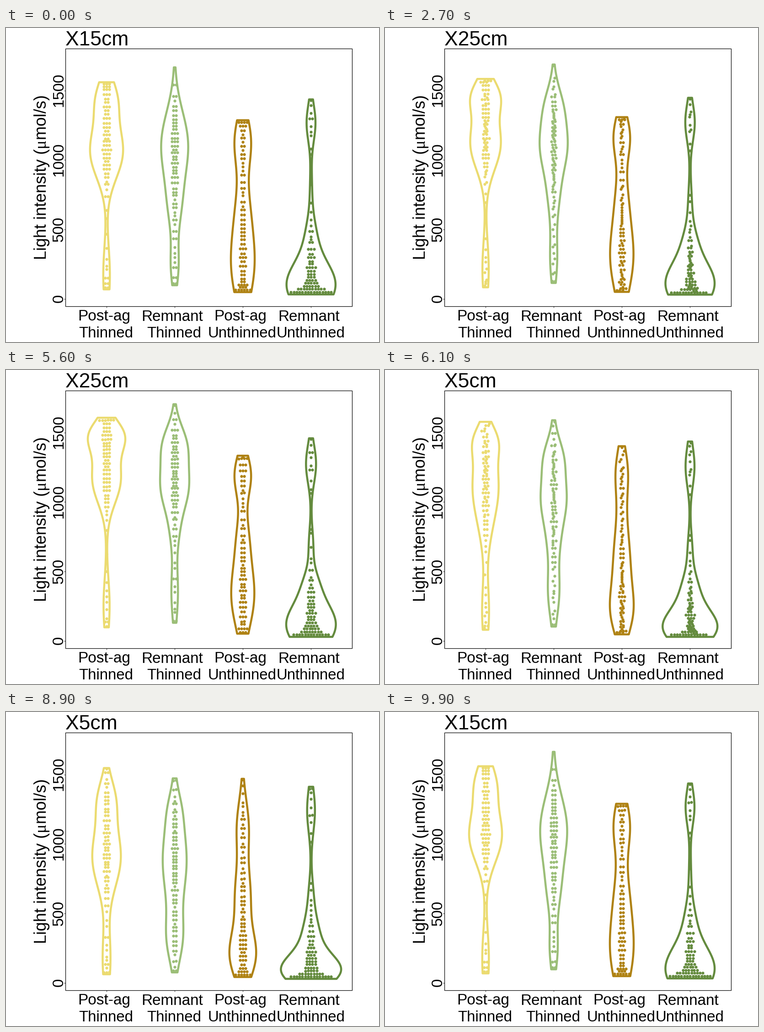
Write a matplotlib script that moves like this. It is 816x686 px and loops after 10 s.

```python
import math

import matplotlib.pyplot as plt
import numpy as np
from matplotlib.animation import FuncAnimation
from matplotlib.patches import Polygon, Rectangle

W, H, DPI = 816, 686, 128
CENTERS = [220, 369, 518, 667.3]
COLORS = ["#EBDB70", "#9BBE77", "#AF8213", "#648B3E"]
TITLES = ["X15cm", "X25cm", "X5cm"]
STARTS = [22, 56, 89]  # first moving frame after each state
STEPS = 12
DOTS, DOT_GAP, BIN = 86, 6.3, 6.1

plt.rcParams.update({
    "font.family": "Liberation Sans",
    "mathtext.fontset": "custom",
    "mathtext.rm": "Liberation Serif",
})


def pt(px):
    return px * 72 / DPI


def mixture(y, bumps):
    """Half width at height y: a sum of bell curves (center, spread, size)."""
    return sum(size * np.exp(-((y - mid) / spread) ** 2 / 2)
               for mid, spread, size in bumps)


def sample(top, bottom, bumps, rng):
    """Heights spread like the mixture; those past an end fold back inside."""
    grid = np.linspace(top - 100, bottom + 100, 1200)
    total = np.cumsum(mixture(grid, bumps))
    share = (np.arange(DOTS) + rng.random(DOTS)) / DOTS
    y = np.interp(share * total[-1], total, grid)
    y = np.where(y > bottom, bottom - 0.3 * (y - bottom), y)
    y = np.where(y < top, top + 0.3 * (top - y), y)
    y = np.sort(y)[::-1]
    y[0], y[-1] = bottom - 2, top + 2
    return y


def stack(heights):
    """Bin falling heights and set each bin as one centered row of dots."""
    dots, first = [], 0
    while first < len(heights):
        n = int(np.sum(heights[first:] > heights[first] - BIN))
        row = heights[first:first + n]
        y = (row[0] + row[-1]) / 2
        dots += [((k - (n - 1) / 2) * DOT_GAP, y) for k in range(n)]
        first += n
    return np.array(dots)


class Violin:
    def __init__(self, top, bottom, bumps, seed):
        self.ys = np.linspace(top, bottom, 160)
        self.widths = mixture(self.ys, bumps)
        rng = np.random.default_rng(seed)
        self.dots = stack(sample(top, bottom, bumps, rng))


violins = {}


def add(state, group, top, bottom, *bumps):
    violins[state, group] = Violin(top, bottom, bumps, 10 * state + group)


add(0, 0, 118.5, 571, (153, 44, 20.5), (270, 58, 35.5), (540, 65, 7.2))
add(0, 1, 86, 562, (255, 72, 29), (390, 55, 11), (520, 46, 8))
add(0, 2, 201.5, 577, (247, 55, 17.5), (385, 60, 9), (515, 80, 25))
add(0, 3, 156, 582, (207, 40, 9.7), (360, 50, 2.3), (450, 38, 8), (561, 52, 53.5))

add(1, 0, 104, 562, (142, 34, 35), (238, 52, 31), (515, 60, 6.6))
add(1, 1, 73.5, 552, (160, 42, 22.5), (255, 52, 29.5), (355, 40, 6), (485, 60, 7))
add(1, 2, 188, 576, (230, 45, 18), (360, 50, 9), (490, 72, 25))
add(1, 3, 149, 583, (205, 42, 11), (385, 40, 4.8), (465, 30, 9), (556, 50, 54))

add(2, 0, 122.5, 573, (190, 45, 16.5), (318, 66, 31), (540, 65, 8.5))
add(2, 1, 146, 569, (210, 38, 6), (325, 85, 26), (497, 52, 15))
add(2, 2, 145, 579, (250, 58, 12.5), (400, 62, 16), (532, 52, 27.5))
add(2, 3, 163.5, 583, (215, 48, 8.5), (405, 40, 5), (490, 40, 17), (565, 34, 63))

fig = plt.figure(figsize=(W / DPI, H / DPI), dpi=DPI, facecolor="white")
ax = fig.add_axes([0, 0, 1, 1])
ax.set_xlim(0, W)
ax.set_ylim(H, 0)
ax.axis("off")


def label(x, y, text, px, ha="center", rotation=0):
    return ax.text(x, y, text, fontsize=pt(px), ha=ha, va="baseline",
                   rotation=rotation, rotation_mode="anchor", color="black")


def tick(xs, ys):
    ax.plot(xs, ys, color="#333333", lw=pt(1), solid_capstyle="butt")


for value in range(0, 2000, 500):
    y = 592.3 - value * 0.3038
    tick([127, 130], [y, y])
    label(124.5, y - 1, str(value), 33.3, rotation=90)
for cx, first, second in zip(CENTERS, ["Post-ag", "Remnant"] * 2,
                             ["Thinned"] * 2 + ["Unthinned"] * 2):
    tick([cx, cx], [608, 611])
    label(cx - 5, 639.5, first, 33.2)
    label(cx - 1, 675.5, second, 33)
label(88, 326.5, r"Light intensity ($\mathrm{\mu}$mol/s)", 36.1, rotation=90)
title = label(130, 38.5, TITLES[0], 44.4, ha="left")

outlines, dot_sets = [], []
for color in COLORS:
    shape = Polygon([[0, 0], [1, 1], [0, 1]], closed=True, fill=False,
                    ec=color, lw=pt(4.5), joinstyle="round")
    outlines.append(ax.add_patch(shape))
    dot_sets += ax.plot([], [], "o", color=color, ms=pt(6.3), mew=0)
ax.add_patch(Rectangle((129.7, 44.7), 627.3, 563.3, fill=False,
                       ec="black", lw=pt(1.2), zorder=5))


def phase(frame):
    """Current state and the step (0 to STEPS - 1) towards the next one."""
    for state, start in enumerate(STARTS):
        if frame < start:
            return state, 0
        if frame < start + STEPS - 1:
            return state, frame - start + 1
    return 0, 0


def draw(frame):
    state, step = phase(frame)
    after = (state + 1) % len(TITLES)
    ease = (1 - math.cos(math.pi * step / STEPS)) / 2
    title.set_text(TITLES[after if step >= STEPS / 2 else state])

    def tween(a, b):
        return a + (b - a) * ease

    for g, cx in enumerate(CENTERS):
        a, b = violins[state, g], violins[after, g]
        ys, half = tween(a.ys, b.ys), tween(a.widths, b.widths)
        outlines[g].set_xy(np.column_stack([
            np.concatenate([cx - half, (cx + half)[::-1]]),
            np.concatenate([ys, ys[::-1]])]))
        dots = tween(a.dots, b.dots)
        dot_sets[g].set_data(cx + dots[:, 0], dots[:, 1])
    return [title, *outlines, *dot_sets]


anim = FuncAnimation(fig, draw, frames=100, interval=100, repeat=True,
                     repeat_delay=0, blit=False)
plt.show()
```
